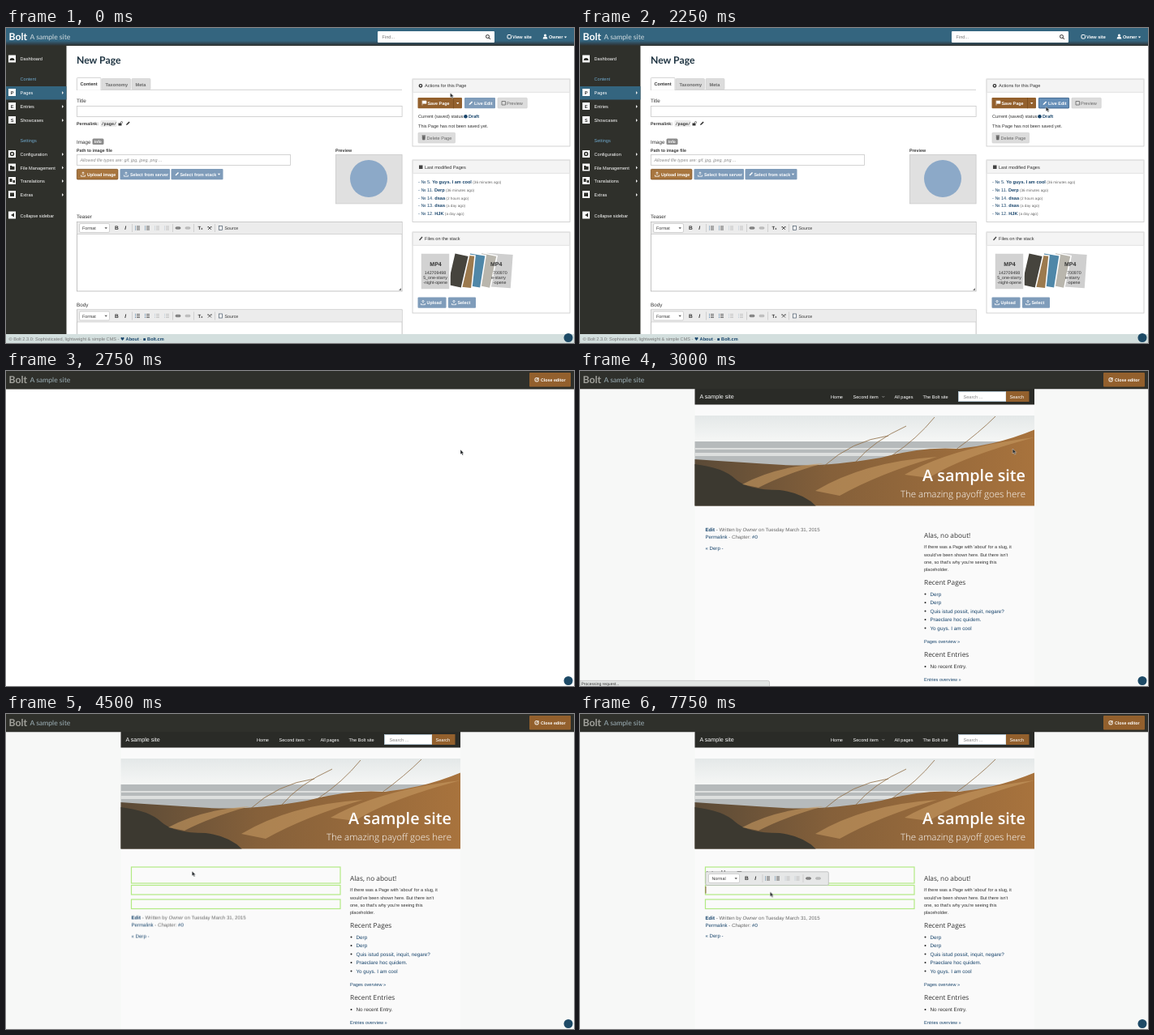
An HTML page for the animation above (8 s loop, 700x389 px).

```html
<!DOCTYPE html>
<html lang="en">
<head>
<meta charset="utf-8">
<title>Live editor</title>
<style>
html, body { margin: 0; width: 100%; height: 100%; overflow: hidden; background: #fff; }
svg { display: block; width: 700px; height: 389px; }
text { font: 5.6px "Liberation Sans", Arial, sans-serif; fill: #333; white-space: pre; text-rendering: geometricPrecision; }
.b { font-weight: 700; }
.w, .w text { fill: #fff; }
.btn text { font-weight: 700; font-size: 5.4px; fill: #fff; }
.btn .dim { fill: #666; font-weight: 400; font-size: 5.6px; }
.link, .link text { fill: #17446b; }
.lab { font-size: 6.3px; }
.sm { font-size: 5.3px; }
.i { font-family: "DejaVu Sans", sans-serif; }
.h { font-family: "Open Sans", sans-serif; font-size: 8.3px; }
.brand { font-family: Lato, sans-serif; font-weight: 700; font-size: 12.2px; }
.site { font-family: Lato, sans-serif; font-size: 8.6px; }
.box { fill: #fff; stroke: #c8c8c8; stroke-width: .8; }
.brown { fill: #93602d; }
.blue { fill: #7f9cba; }
.grey { fill: #dcdcdc; stroke: #cfcfcf; stroke-width: .6; }
.field { fill: none; stroke: #b2ea84; stroke-width: 1.2; }

.form, .blank, .dark, .page, .fields, .wait, .meta, .caret, .tools, .cursor, .on {
  animation: 8s step-end infinite;
}
.form { animation-name: form; }
.blank { animation-name: blank; }
.dark { animation-name: dark; }
.page { animation-name: page; }
.wait { animation-name: wait; }
.fields { animation-name: fields; }
.meta { animation-name: meta; }
.caret { animation-name: caret; }
.tools { animation-name: tools; }
.cursor { animation-name: cursor; }
/* appears at --at and leaves after its scene has ended */
.on { visibility: hidden; animation-name: on; animation-delay: var(--at); }

@keyframes on { 0% { visibility: visible } 40%, 100% { visibility: hidden } }
@keyframes form { 0% { opacity: 1 } 31.25%, 100% { opacity: 0 } }
@keyframes blank { 0% { opacity: 0 } 31.25% { opacity: 1 } 34.375%, 100% { opacity: 0 } }
@keyframes dark { 0% { opacity: 0 } 34.375%, 100% { opacity: 1 } }
@keyframes page { 0% { opacity: 0 } 37.5%, 100% { opacity: 1 } }
@keyframes wait { 0% { opacity: 1 } 43.75%, 100% { opacity: 0 } }
@keyframes fields { 0% { opacity: 0 } 43.75%, 100% { opacity: 1 } }
@keyframes meta { 0% { transform: none } 43.75%, 100% { transform: translateY(55.5px) } }
@keyframes tools { 0% { opacity: .4 } 96.875%, 100% { opacity: 1 } }
@keyframes caret {
  0% { opacity: 0; transform: none }
  59.375% { opacity: 1; transform: none }
  62.5% { opacity: 1; transform: translateX(18.2px) }
  65.625% { opacity: 1; transform: translateX(21.7px) }
  68.75% { opacity: 1; transform: translateX(33.8px) }
  71.875% { opacity: 1; transform: translateX(37.4px) }
  75% { opacity: 1; transform: translateX(45.2px) }
  78.125% { opacity: 1; transform: translateX(66.3px) }
  81.25% { opacity: 1; transform: translateX(81.8px) }
  84.375% { opacity: 1; transform: translateX(98.2px) }
  90.625%, 100% { opacity: 0; transform: none }
}
@keyframes cursor {
  0% { transform: translate(547.5px, 80px) }
  3.125% { transform: translate(512px, 86px) }
  6.25% { transform: translate(466px, 93px) }
  9.375% { transform: translate(458px, 94px) }
  12.5% { transform: translate(520px, 93px) }
  15.625% { transform: translate(577px, 92px) }
  18.75% { transform: translate(577px, 95px) }
  21.875% { transform: translate(574.3px, 97px) }
  34.375% { transform: translate(560px, 97px) }
  37.5% { transform: translate(533.3px, 96px) }
  40.625% { transform: translate(488px, 108px) }
  43.75% { transform: translate(430px, 130px) }
  46.875% { transform: translate(370px, 152px) }
  50% { transform: translate(305px, 176px) }
  53.125% { transform: translate(250px, 190px) }
  56.25% { transform: translate(229.3px, 194px) }
  87.5% { transform: translate(231px, 204px) }
  90.625% { transform: translate(233px, 214px) }
  93.75%, 100% { transform: translate(234.3px, 219.5px) }
}
</style>
</head>
<body>
<svg viewBox="0 0 700 389">
<defs>
  <linearGradient id="bar" x2="0" y2="1">
    <stop offset=".72" stop-color="#34657f"/><stop offset=".92" stop-color="#2f3d45"/><stop offset="1" stop-color="#2f302b"/>
  </linearGradient>
  <linearGradient id="sky" x2="0" y2="1"><stop stop-color="#e4e8e8"/><stop offset="1" stop-color="#f6f7f6"/></linearGradient>
  <linearGradient id="dune"><stop stop-color="#5a4a37"/><stop offset=".4" stop-color="#85603a"/><stop offset="1" stop-color="#a8733d"/></linearGradient>
  <g id="list" stroke="#444" stroke-width=".8"><path d="M-1 -2h4M-1 0h4M-1 2h4"/><path d="M-3 -2h1M-3 0h1M-3 2h1" stroke="#27608f"/></g>
  <g id="chain"><rect x="-3" y="-1.3" width="6" height="2.6" rx="1.2" fill="#888" stroke="#555" stroke-width=".5"/></g>
  <g id="marks">
    <text class="b" x="134" y="249" style="font-size:6.6px">B</text>
    <text class="b" x="146.3" y="249" style="font-size:6.6px;font-style:italic">I</text>
    <use href="#list" x="162" y="247"/><use href="#list" x="174" y="247"/>
  </g>
  <g id="more">
    <path d="M155.5 242v10M205.5 242v10" stroke="#c4c4c4" stroke-width=".7"/>
    <g opacity=".3"><use href="#list" x="186" y="247"/><use href="#list" x="198" y="247"/></g>
    <use href="#chain" x="212" y="247"/><use href="#chain" x="224" y="247" opacity=".45"/>
  </g>
  <g id="editor">
    <rect class="box" x="87.4" y="239.4" width="400.7" height="85.6" style="stroke:#b4b4b4"/>
    <rect x="87.8" y="239.8" width="400" height="14.5" fill="#ececec"/>
    <path d="M87.5 254.5h400.5M231.5 242v10M257.5 242v10" stroke="#c4c4c4" stroke-width=".7"/>
    <rect class="box" x="90.5" y="241.5" width="37" height="11" rx="1.5"/>
    <text class="sm" x="94" y="249">Format</text><path d="M121.5 246.3h3.4l-1.7 2z" fill="#555"/>
    <use href="#marks"/><use href="#more"/>
    <text class="b" x="236.5" y="249" style="font-size:6px">T<tspan font-size="4">x</tspan></text>
    <path d="M249 245l4 4m0-4l-4 4M249 245v1.5M253 245v1.5" stroke="#333" stroke-width=".8"/>
    <rect x="262.5" y="244.5" width="4" height="5" fill="#fff" stroke="#456" stroke-width=".7"/>
    <text class="sm" x="269.5" y="249">Source</text>
    <path d="M484 324l3-3v3z" fill="#777"/>
  </g>
  <path id="arrow" d="M-1 -2l2 2-2 2z" fill="#e8e8e8"/>
  <path id="down" d="M-1.7 -1h3.4l-1.7 2z"/>
  <path id="up" d="M-2.5 1v1.7h5V1M0 1v-3.5M-1.5 -1.2L0 -2.7l1.5 1.5" fill="none" stroke="#fff" stroke-width=".8"/>
  <g id="close">
    <rect class="brown" x="645" y="2" width="51" height="17.5" rx="1"/>
    <rect x="652" y="8.7" width="4.2" height="4.2" rx="1" fill="none" stroke="#fff"/>
    <path d="M653.6 11.3l2.8-2.8" stroke="#fff"/>
    <text class="b w sm" x="659" y="12.8">Close editor</text>
  </g>
  <g id="head">
    <rect width="700" height="22" fill="url(#bar)"/>
    <text class="brand w" x="3.5" y="14.5">Bolt</text>
    <text class="site" x="29.5" y="14" style="fill:#d3dde1">A sample site</text>
  </g>
  <clipPath id="photo"><rect x="141.5" y="55" width="418.5" height="111.5"/></clipPath>
</defs>
<rect width="700" height="389" fill="#fff"/>

<g class="form">
  <rect y="22" width="74.5" height="356" fill="#2f302b"/>
  <use href="#head"/>
  <rect x="458" y="4" width="144" height="14" rx="1" fill="#fff"/>
  <text x="463.5" y="13" style="fill:#777">Find...</text>
  <g fill="none" stroke="#333"><circle cx="593.5" cy="10.5" r="2"/><path d="M595 12l2 2"/></g>
  <g class="w">
    <rect x="618" y="8.5" width="4.5" height="4.5" rx="1" fill="none" stroke="#fff"/>
    <text class="b" x="624" y="13">View site</text>
    <circle cx="664.5" cy="9" r="1.6"/><path d="M661.7 13.5q0-3 2.8-3t2.8 3z"/>
    <text class="b" x="669" y="13">Owner</text><use href="#down" x="689.5" y="11.5"/>
  </g>

  <rect y="72" width="74.5" height="16.5" fill="#34657f"/>
  <g class="w">
    <text x="17.5" y="40">Dashboard</text>
    <text x="17.5" y="82">Pages</text><text x="17.5" y="99">Entries</text><text x="17.5" y="116">Showcases</text>
    <text x="17.5" y="158">Configuration</text><text x="17.5" y="174.5">File Management</text>
    <text x="17.5" y="191">Translations</text><text x="17.5" y="208">Extras</text><text x="17.5" y="233.5">Collapse sidebar</text>
    <text x="17.5" y="65" style="fill:#6fa9cd">Content</text><text x="17.5" y="141" style="fill:#6fa9cd">Settings</text>
  </g>
  <path d="M7.5 38v0M7.5 79.500v0M7.5 96.500v0M7.5 113.500v0M7.5 155.500v0M7.5 172v0M7.5 188.500v0M7.5 205.500v0M7.5 231v0" stroke="#fff" stroke-width="9" stroke-linecap="square"/>
  <g text-anchor="middle">
    <text class="b" x="7.5" y="81.700">P</text><text class="b" x="7.5" y="98.700">E</text><text class="b" x="7.5" y="115.700">S</text>
  </g>
  <g fill="#2f302b">
    <path d="M4.5 40a3 3 0 0 1 6 0zM5 170h2l1 1h2.5v4H5zM4.5 186h3v4h-3zM8.5 188h2.5v3H8.5zM5 203.5h5v4.5H5zM10 228.5v5l-4-2.5z"/>
    <circle cx="7.5" cy="155.5" r="2" fill="none" stroke="#2f302b" stroke-width="1.5"/>
  </g>
  <use href="#arrow" x="70" y="80"/><use href="#arrow" x="70" y="97"/><use href="#arrow" x="70" y="114"/>
  <use href="#arrow" x="70" y="156"/><use href="#arrow" x="70" y="172.5"/><use href="#arrow" x="70" y="189"/><use href="#arrow" x="70" y="206"/>

  <text class="brand" x="87" y="44" style="fill:#1f3442">New Page</text>
  <path d="M87 76.4h401" stroke="#c8c8c8" stroke-width=".8"/>
  <rect class="grey" x="118" y="62.5" width="35.5" height="13.5" rx="1"/><rect class="grey" x="155" y="62.5" width="23" height="13.5" rx="1"/>
  <path class="box" d="M87.4 76.8V62.4q0-1 1-1h27.6q1 0 1 1v14.4"/>
  <text class="b" x="91.5" y="70.5">Content</text>
  <text class="b" x="122.5" y="71.5" style="fill:#666">Taxonomy</text><text class="b" x="159.5" y="71.5" style="fill:#666">Meta</text>
  <text class="lab" x="87" y="92">Title</text><rect class="box" x="87.4" y="96.4" width="400.7" height="13"/>
  <text class="b sm" x="87" y="120">Permalink:</text>
  <rect x="116.5" y="114" width="20" height="8" rx="1" fill="#ececec"/>
  <text x="117.5" y="120" style="font:700 5.2px 'Liberation Mono',monospace">/page/</text>
  <rect x="138.5" y="117.5" width="4" height="3" fill="#333"/><path d="M141.5 117.5v-1a1 1 0 0 1 2 0v1" fill="none" stroke="#333" stroke-width=".7"/>
  <path d="M148 120l.5-1.6 3-3 1.2 1.2-3 3z" fill="#333"/>
  <text class="lab" x="87" y="143">Image</text><rect x="106.5" y="136.5" width="14" height="7.5" rx="1.5" fill="#8c8c8c"/><text class="b w" x="109" y="142" style="font-size:4.8px">Info</text>
  <text class="b sm" x="87" y="153">Path to image file</text><text class="b sm" x="406" y="153">Preview</text>
  <rect class="box" x="87.4" y="156.4" width="263" height="13"/>
  <text x="91.5" y="164.5" style="font-style:italic;fill:#888;font-size:5.4px">Allowed file types are: gif, jpg, jpeg, png ...</text>
  <g class="btn">
    <rect x="87.4" y="174.4" width="50.5" height="12.5" rx="1" fill="#a8763f" stroke="#7c4e20" stroke-width=".8"/>
    <rect class="blue" x="140.5" y="174" width="61.5" height="13.3" rx="1"/><rect class="blue" x="203.5" y="174" width="64" height="13.3" rx="1"/>
    <use href="#up" x="95" y="180.5"/><text x="100" y="182.5">Upload image</text>
    <use href="#up" x="148" y="180.5"/><text x="153" y="182.5">Select from server</text>
    <path d="M209 182l3.5-3.5" stroke="#fff" stroke-width="1.5"/><text x="214.5" y="182.5">Select from stack</text>
    <use href="#down" x="262.5" y="180.8" fill="#fff"/>
  </g>
  <rect x="406.4" y="156.4" width="81.7" height="60.5" fill="#e0e0e0" stroke="#cacaca" stroke-width=".8"/>
  <circle cx="447" cy="186" r="23" fill="#8ca9c8"/>
  <text class="lab" x="87" y="235">Teaser</text><use href="#editor"/>
  <text class="lab" x="87" y="343.5">Body</text><use href="#editor" y="108.5"/>

  <rect class="box" x="501" y="63" width="194" height="83"/><rect class="box" x="501" y="163" width="194" height="76.5"/><rect class="box" x="501" y="252" width="194" height="100"/>
  <path d="M501.4 63.4h193.2v16H501.4zM501.4 163.4h193.2v16H501.4zM501.4 252.4h193.2v16H501.4z" fill="#f4f4f4" stroke="#ddd" stroke-width=".7"/>
  <circle cx="511" cy="71.3" r="1.7" fill="none" stroke="#333" stroke-width="1.3"/>
  <path d="M509 169.5h4.5v4.5H509z" fill="#444"/><path d="M509.5 262l3.5-4" stroke="#444" stroke-width="1.4"/>
  <text x="516" y="73.3">Actions for this Page</text><text x="516" y="173.5">Last modified Pages</text><text x="516" y="262.3">Files on the stack</text>
  <g class="btn">
    <rect class="brown" x="507.5" y="86" width="54.5" height="13.3" rx="1"/><path d="M551.5 86v13.3" stroke="#75481b" stroke-width=".7"/>
    <path d="M513 89.5v6M513.5 90h4.5v3.2h-4.5z" fill="#fff" stroke="#fff" stroke-width=".6"/>
    <text x="519.5" y="94.5">Save Page</text><use href="#down" x="556.7" y="93" fill="#fff"/>
    <rect class="blue" x="565" y="86" width="38" height="13.3" rx="1"/>
    <rect class="on" style="--at:1.5s" x="565.4" y="86.4" width="37.2" height="12.5" rx="1" fill="#668fb8" stroke="#3f658c" stroke-width=".8"/>
    <path d="M570.5 95l.5-1.6 3-3 1.2 1.2-3 3z" fill="#fff"/><text x="577" y="94.5">Live Edit</text>
    <rect class="grey" x="606" y="86.3" width="36.3" height="12.7" rx="1"/>
    <path d="M611 90.5h4.5v4.5h-4.5z" fill="none" stroke="#666" stroke-width=".8"/><text class="dim" x="617" y="94.5">Preview</text>
    <rect class="grey" x="508" y="129.3" width="45.5" height="12.7" rx="1"/>
    <path d="M513 133.5h3.5l-.4 4.5h-2.7zM512.5 132.5h4.5" fill="#666" stroke="#666" stroke-width=".6"/><text class="dim" x="518.5" y="137.6">Delete Page</text>
    <rect class="blue" x="507.5" y="332.5" width="35" height="13.3" rx="1"/><rect class="blue" x="545" y="332.5" width="34" height="13.3" rx="1"/>
    <use href="#up" x="514" y="339"/><text x="518.5" y="341">Upload</text><use href="#up" x="552" y="339"/><text x="556.5" y="341">Select</text>
  </g>
  <text x="508" y="111">Current (saved) status:</text><circle cx="566.5" cy="109.2" r="2.3" fill="#17446b"/><text class="b link" x="570" y="111">Draft</text>
  <text x="508" y="122.8">This Page has not been saved yet.</text>
  <g class="link">
    <text x="508" y="192">- № 5. <tspan class="b">Yo guys. I am cool</tspan><tspan font-size="4.7" fill="#666"> (36 minutes ago)</tspan></text>
    <text x="508" y="202">- № 11. <tspan class="b">Derp</tspan><tspan font-size="4.7" fill="#666"> (36 minutes ago)</tspan></text>
    <text x="508" y="211.7">- № 14. <tspan class="b">dsaa</tspan><tspan font-size="4.7" fill="#666"> (2 hours ago)</tspan></text>
    <text x="508" y="221.4">- № 13. <tspan class="b">dsas</tspan><tspan font-size="4.7" fill="#666"> (a day ago)</tspan></text>
    <text x="508" y="231">- № 12. <tspan class="b">HJK</tspan><tspan font-size="4.7" fill="#666"> (a day ago)</tspan></text>
  </g>
  <g stroke="#fff" stroke-width="1.5">
    <rect x="590" y="278" width="34" height="43" fill="#cfcfcf" transform="rotate(4 607 300)"/>
    <rect x="581" y="279" width="20" height="41" fill="#b9b6ad" transform="rotate(12 591 300)"/>
    <rect x="568" y="279" width="20" height="41" fill="#4f87a8" transform="rotate(9 578 300)"/>
    <rect x="558" y="280" width="18" height="41" fill="#9c7a4e" transform="rotate(6 567 300)"/>
    <rect x="548" y="279" width="18" height="41" fill="#46443d" transform="rotate(13 557 300)"/>
    <rect x="511" y="278" width="36" height="45" fill="#d2d2d2"/>
  </g>
  <g text-anchor="middle">
    <text class="b" x="529.5" y="293.5" style="font-size:7px">MP4</text>
    <text class="sm" x="529" y="303.5">142709498</text><text class="sm" x="529" y="309.8">5_one-starry</text><text class="sm" x="529" y="316">-night-opene</text>
  </g>
  <text class="b" x="597" y="293.5" style="font-size:7px">MP4</text>
  <text class="sm" x="600" y="303.5">700970</text><text class="sm" x="598" y="309.8">e-starry</text><text class="sm" x="600" y="316">-opene</text>

  <rect y="378" width="700" height="11" fill="#d3dfde"/>
  <text x="3.5" y="386" style="fill:#777">© Bolt 2.3.0: Sophisticated, lightweight &amp; simple CMS - <tspan class="i link">♥</tspan> <tspan class="b link">About</tspan> - <tspan class="i link">▪</tspan> <tspan class="b link">Bolt.cm</tspan></text>
</g>

<g class="blank"><use href="#head"/><use href="#close"/></g>

<g class="dark">
  <rect width="700" height="22.5" fill="#2f302b"/>
  <text class="brand" x="3.5" y="14.5" style="fill:#a2a29c">Bolt</text>
  <text class="site" x="29.5" y="14" style="fill:#9fb1b8">A sample site</text>
  <use href="#close"/>
</g>

<g class="page">
  <rect y="22.5" width="700" height="366.5" fill="#f7f8f7"/>
  <rect x="141.5" y="22" width="418.5" height="367" fill="#fafafa"/>
  <rect x="141.5" y="22" width="418.5" height="19.5" fill="#2a2b27"/>
  <g class="w">
    <text x="147.5" y="34.2" style="font-size:7.1px">A sample site</text>
    <text x="309" y="33.7">Home</text><text x="336.5" y="33.7">Second item</text><text x="387.5" y="33.7">All pages</text><text x="422.5" y="33.7">The Bolt site</text>
    <path d="M372.3 31l1.5 1.5 1.5-1.5" fill="none" stroke="#aaa" stroke-width=".7"/>
    <rect x="466.5" y="25.5" width="58.5" height="12" fill="#fff" stroke="#b9cfdd" stroke-width=".8"/><text x="472.5" y="33.5" style="fill:#888">Search ...</text>
    <rect class="brown" x="525" y="25" width="28.5" height="13"/><text x="529.5" y="33.5">Search</text>
  </g>

  <g clip-path="url(#photo)">
    <rect x="141" y="55" width="420" height="33" fill="url(#sky)"/>
    <rect x="141" y="87" width="420" height="30" fill="#b6babb"/>
    <path d="M141 95h420v2H141zM141 101h420v4H141z" fill="#dddfde"/>
    <path d="M141 109q60 4 110 7t120-9q50-14 95-11 50-5 95-24v96H141z" fill="url(#dune)"/>
    <path d="M141 115q35 4 50 18t55 14q30 4 45 20H141z" fill="#3c3930"/>
    <path d="M290 148q60-36 150-42-70 20-120 48zM400 128q60-34 160-46-90 24-130 50zM200 140q40-22 100-26-50 14-80 30z" fill="#c79a62" opacity=".6"/>
    <path d="M340 112q22-26 62-44M385 104q30-20 52-47M462 98q30-22 50-42M300 118q35-32 80-38" fill="none" stroke="#8d6b43" stroke-width=".8"/>
    <g class="w" text-anchor="end">
      <text x="549" y="136" style="font:600 19.8px 'Open Sans',sans-serif">A sample site</text>
      <text x="549" y="156" style="font:300 11.5px 'Open Sans',sans-serif">The amazing payoff goes here</text>
    </g>
  </g>

  <g class="meta">
    <text x="154.5" y="198.2" style="font-size:6.1px;fill:#666"><tspan class="b link">Edit</tspan> - Written by <tspan font-style="italic">Owner</tspan> on Tuesday March 31, 2015</text>
    <text x="154.5" y="207.3" style="font-size:6.1px;fill:#666"><tspan class="link">Permalink</tspan> - <tspan font-style="italic">Chapter:</tspan> <tspan class="link">#0</tspan></text>
    <text class="link" x="154.5" y="220.5" style="font-size:6.1px">« Derp -</text>
  </g>

  <text class="h" x="424" y="206">Alas, no about!</text>
  <text x="424" y="219.3">If there was a Page with 'about' for a slug, it</text>
  <text x="424" y="228.5">would've been shown here. But there isn't</text>
  <text x="424" y="237.7">one, so that's why you're seeing this</text>
  <text x="424" y="246.9">placeholder.</text>
  <text class="h" x="424" y="264">Recent Pages</text>
  <g class="link">
    <text class="lab" x="431.5" y="277.7">Derp</text><text class="lab" x="431.5" y="288.2">Derp</text>
    <text class="lab" x="431.5" y="298.7">Quis istud possit, inquit, negare?</text>
    <text class="lab" x="431.5" y="309.2">Praeclare hoc quidem.</text><text class="lab" x="431.5" y="319.7">Yo guys. I am cool</text>
    <text x="424" y="336">Pages overview »</text><text x="424" y="383">Entries overview »</text>
  </g>
  <path d="M425.5 275.5v0M425.5 286v0M425.5 296.5v0M425.5 307v0M425.5 317.5v0M425.5 365v0" stroke="#222" stroke-width="2" stroke-linecap="round"/>
  <text class="h" x="424" y="353.2">Recent Entries</text>
  <text class="lab" x="431.5" y="367">No recent Entry.</text>

  <g class="wait">
    <path d="M0 382.4h231.5q2 0 2 2v5H0z" fill="#e2e5e4" stroke="#bbb" stroke-width=".7"/>
    <text x="1.5" y="388" style="font-size:5px">Processing request...</text>
  </g>
  <g class="fields">
    <rect class="field" x="154.5" y="189" width="257.5" height="20"/>
    <rect class="field" x="154.5" y="211.5" width="257.5" height="11.5"/>
    <rect class="field" x="154.5" y="229" width="257.5" height="11.5"/>
  </g>
  <text class="h" x="154.8" y="204.3" style="font-size:14px;fill:#222"><tspan class="on" style="--at:5s">He</tspan><tspan class="on" style="--at:5.25s">l</tspan><tspan class="on" style="--at:5.5s">lo</tspan><tspan class="on" style="--at:6s"> E</tspan><tspan class="on" style="--at:6.25s">ver</tspan><tspan class="on" style="--at:6.5s">yo</tspan><tspan class="on" style="--at:6.75s">ne</tspan></text>
  <rect class="caret" x="155" y="189.5" width=".8" height="19" fill="#222"/>
  <rect class="on" style="--at:7.25s" x="154.5" y="213" width=".9" height="8.5" fill="#7a4a2a"/>
  <g class="on" style="--at:7.5s">
    <rect x="154.8" y="194.8" width="151.5" height="16.7" rx="1.5" fill="#e6e7e7" stroke="#b5b8b8" stroke-width=".8"/>
    <rect class="box" x="158.5" y="197.5" width="38" height="11" rx="1.5"/><path d="M190.5 202.3h3.4l-1.7 2z" fill="#555"/>
    <g class="tools"><text class="sm" x="162.5" y="205">Normal</text><use href="#marks" x="69" y="-44"/></g>
    <use href="#more" x="69.5" y="-44"/>
  </g>
</g>

<circle cx="693" cy="382.5" r="5.5" fill="#1d4a66"/>
<g class="cursor"><path d="M0 0v6l1.4-1.2 1.1 2.3 1.1-.5-1.1-2.2h1.8z" fill="#1c2023" stroke="#fff" stroke-width=".4"/></g>
</svg>
</body>
</html>
```
